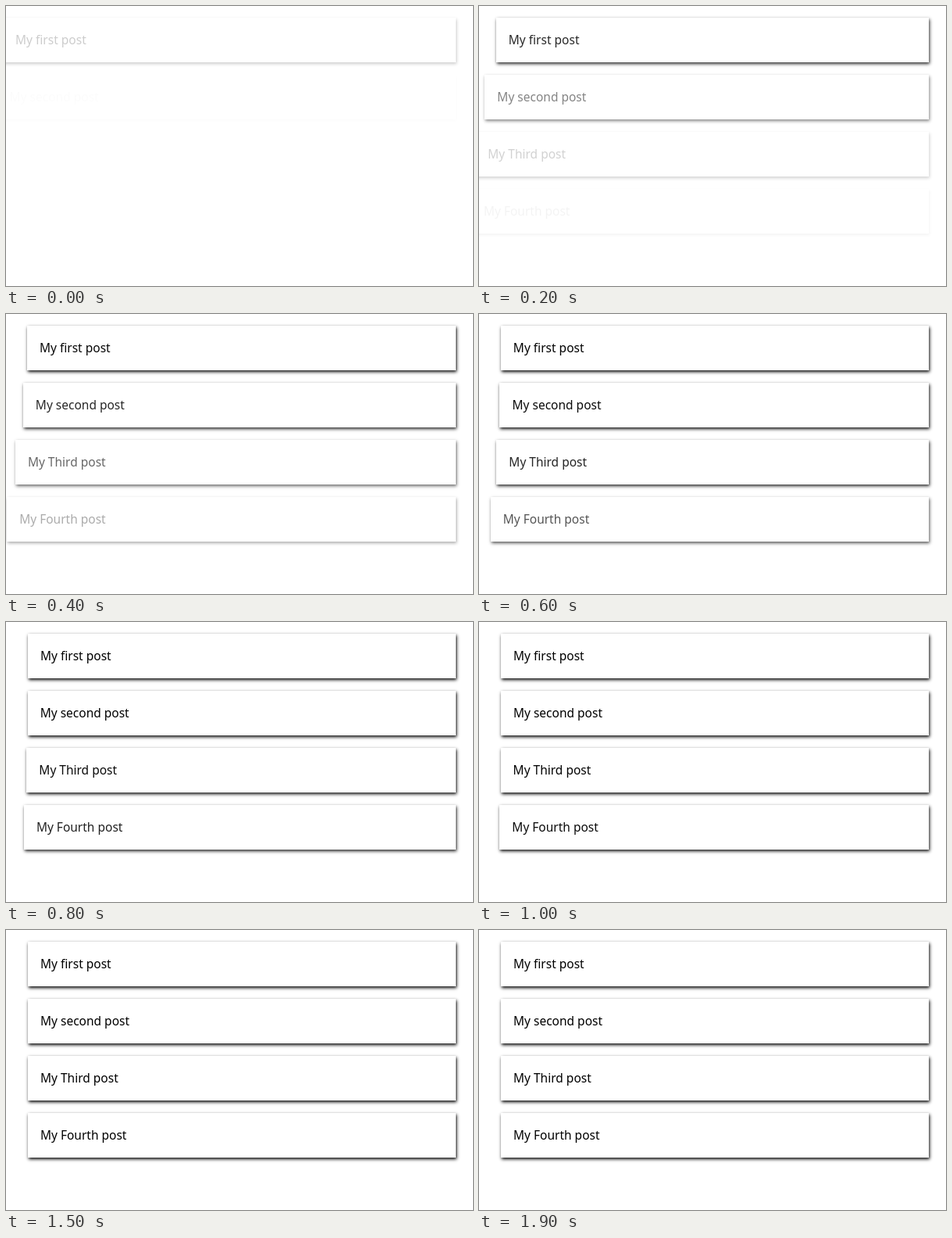
Write an HTML page with a canvas that moves like this. It is 598x358 px and loops after 3100 ms.

```html
<!DOCTYPE html>
<html lang="en">
<head>
<meta charset="utf-8">
<title>Staggered list</title>
<style>
  html, body { margin: 0; width: 100%; height: 100%; overflow: hidden; background: #fff; }
  canvas { display: block; width: 598px; height: 358px; }
</style>
</head>
<body>
<canvas id="stage" width="598" height="358"></canvas>
<script>
const ctx = document.getElementById('stage').getContext('2d');

const LOOP = 3100, STEP = 100, LAST = 1900;
const LABELS = ['My first post', 'My second post', 'My Third post', 'My Fourth post'];
const CARD = { left: 28, right: 576, top: 15, height: 57, pitch: 73, slide: 40 };

// A chain of springs: the first seeks 1, each other one follows the card above.
const DT = 1 / 60, STIFFNESS = 170, DAMPING = 26, LEAD = 3;

function simulate(ticks) {
  const pos = LABELS.map(() => 0);
  const vel = LABELS.map(() => 0);
  const path = [pos.slice()];
  for (let n = 0; n < ticks; n++) {
    const before = pos.slice();
    for (let i = 0; i < pos.length; i++) {
      const goal = i ? (before[i - 1] + pos[i - 1]) / 2 : 1;
      vel[i] += (STIFFNESS * (goal - pos[i]) - DAMPING * vel[i]) * DT;
      pos[i] += vel[i] * DT;
    }
    path.push(pos.slice());
  }
  return path;
}

const path = simulate(LEAD + Math.ceil(LAST / 1000 / DT) + 1);

function drawCard(label, i, p) {
  const left = CARD.left - CARD.slide * (1 - p);
  const edge = Math.round(left);
  const top = CARD.top + i * CARD.pitch;

  ctx.save();
  ctx.globalAlpha = Math.min(1, p);
  ctx.save();
  ctx.shadowColor = '#000';
  ctx.shadowOffsetX = 1;
  ctx.shadowOffsetY = 2;
  ctx.shadowBlur = 4;
  ctx.fillStyle = '#fff';
  ctx.fillRect(edge, top, CARD.right - edge, CARD.height);
  ctx.restore();

  // Hide the shadow that shows through the translucent card.
  ctx.globalAlpha = 1;
  ctx.fillStyle = '#fff';
  ctx.fillRect(edge, top, CARD.right - edge, CARD.height);

  ctx.globalAlpha = Math.min(1, p);
  ctx.fillStyle = '#000';
  ctx.fillText(label, left + 16, top + 34);
  ctx.restore();
}

function draw(time) {
  const shown = Math.min(LAST, Math.floor(time / STEP) * STEP);
  const state = path[LEAD + Math.round(shown / 1000 / DT)];
  ctx.fillStyle = '#fff';
  ctx.fillRect(0, 0, 598, 358);
  ctx.font = '15.5px "Noto Sans", "Open Sans", sans-serif';
  LABELS.forEach((label, i) => drawCard(label, i, state[i]));
}

const start = performance.now();
function tick() {
  draw((performance.now() - start) % LOOP);
  requestAnimationFrame(tick);
}
tick();
</script>
</body>
</html>
```
